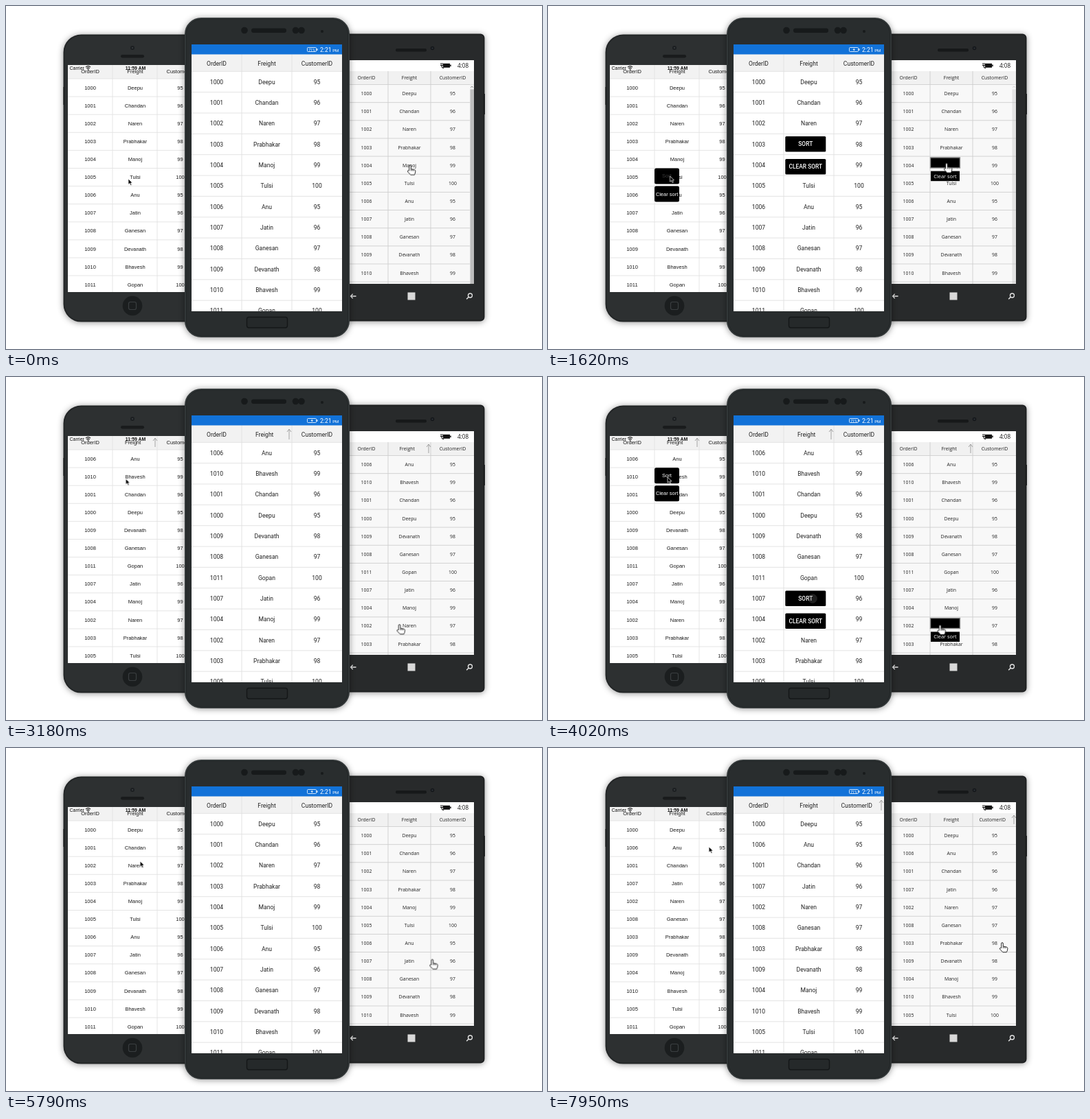
Recreate the animation shown at these times as an HTML page. Size 780x500 px, loop 8000 ms.

```html
<!DOCTYPE html>
<html lang="en">
<head>
<meta charset="utf-8">
<title>Sorting a grid on three phones</title>
<style>
  html, body { margin: 0; width: 100%; height: 100%; overflow: hidden; background: #fff; }
  svg { display: block; width: 780px; height: 500px; }
  text { text-anchor: middle; white-space: pre; }
  .start { text-anchor: start; }
  .ios { font-family: "Liberation Sans", Arial, sans-serif; font-size: 7.5px; }
  .droid { font-family: Roboto, sans-serif; font-size: 8.6px; }
  .win { font-family: "Open Sans", sans-serif; font-size: 6.9px; }
  .droid .popup { font-size: 8.4px; font-weight: 500; }
  .win .popup { font-size: 7.4px; }
  .shadow { filter: drop-shadow(0 1px 5px rgba(0, 0, 0, .42)); }
  .popup text { fill: #fff; }
  .fade { animation: fade 8s linear infinite; }
  @keyframes fade {
    0%, 4% { opacity: 1; }
    14%, 21% { opacity: .35; }
    23%, 100% { opacity: 0; }
  }
</style>
</head>
<body>
<svg viewBox="0 0 780 500" id="stage"></svg>
<script>
const LOOP = 8000;
const stage = document.getElementById('stage');
const sheet = document.head.appendChild(document.createElement('style'));
let rules = 0;

// Returns a class whose keyframes follow [ms, declaration] stops.
function motion(stops, easing) {
  const name = 'm' + rules++;
  const frames = stops.map(([ms, css]) => `${ms / LOOP * 100}%{${css}}`).join('');
  sheet.textContent += `@keyframes ${name}{${frames}}.${name}{animation:${name} ${LOOP}ms ${easing} infinite}`;
  return name;
}

// Visible only inside the given [from, to] spans.
function during(spans) {
  const stops = [[0, 'visibility:hidden']];
  for (const [from, to] of spans) {
    if (from === 0) stops.pop();
    stops.push([from, 'visibility:visible']);
    if (to < LOOP) stops.push([to, 'visibility:hidden']);
  }
  return motion(stops, 'step-end');
}

const path = points => motion(points.map(([ms, x, y]) => [ms, `transform:translate(${x}px,${y}px)`]), 'linear');

const rect = (x, y, w, h, fill, more = '') =>
  `<rect x="${x}" y="${y}" width="${w}" height="${h}" fill="${fill}" ${more}/>`;
const disc = (x, y, r, fill, more = '') => `<circle cx="${x}" cy="${y}" r="${r}" fill="${fill}" ${more}/>`;
const line = (d, color, width = 1, more = '') =>
  `<path d="${d}" fill="none" stroke="${color}" stroke-width="${width}" ${more}/>`;
const label = (x, y, str, more = '') => `<text x="${x}" y="${y}" ${more}>${str}</text>`;
const group = (cls, body) => `<g class="${cls}">${body}</g>`;

const heads = ['OrderID', 'Freight', 'CustomerID'];
const rows = ['Deepu', 'Chandan', 'Naren', 'Prabhakar', 'Manoj', 'Tulsi',
  'Anu', 'Jatin', 'Ganesan', 'Devanath', 'Bhavesh', 'Gopan']
  .map((name, i) => [1000 + i, name, 95 + i % 6]);
const orders = {
  id: rows,
  name: [...rows].sort((a, b) => a[1] < b[1] ? -1 : 1),
  customer: [...rows].sort((a, b) => a[2] - b[2])
};

// sorts: times of sort by name, clear, sort by customer.
const ios = {
  cls: 'ios', cols: [90, 155, 220, 286], centers: [122.5, 188, 253.5],
  clip: [90, 86, 180, 331], headTop: 86, headY: 95.5, top: 106, step: 26.1,
  headFill: '#f2f2f2', fill: '#fff', rule: '#e3e3e3', ink: '#1c1c1c', arrow: [3, 13],
  sorts: [1800, 4400, 7500],
  popup: { w: 36, h: 23, gap: 26, lift: 13, r: 2.5, dx: 0, names: ['Sort', 'Clear sort'] },
  popups: [[600, 1800, 1, 5], [3400, 4400, 1, 1], [6950, 7500, 2, 1]]
};
const win = {
  cls: 'win', cols: [493, 556, 618, 681], centers: [524.5, 587, 650],
  clip: [493, 79, 188, 326], headTop: 95, headY: 104.5, top: 114.5, step: 26.15,
  headFill: '#f1f1f1', fill: '#f8f8f8', rule: '#cfcfcf', ink: '#222', arrow: [3, 13],
  sorts: [1800, 4700, 7600],
  popup: { w: 42, h: 14.5, gap: 20, lift: 11.5, r: 0, dx: 1, names: ['Sort', 'Clear sort'] },
  popups: [[700, 1800, 1, 4], [3300, 4700, 1, 9], [6500, 7600, 2, 3]]
};
const droid = {
  cls: 'droid', cols: [270, 343, 416, 489], centers: [306.5, 379.5, 452.5],
  clip: [270, 56, 219, 389], headTop: 70, headY: 83.5, top: 95.3, step: 30.35,
  headFill: '#f2f2f2', fill: '#fff', rule: '#e0e0e0', ink: '#222', arrow: [4, 15],
  sorts: [2560, 4980, 7450],
  popup: { w: 59, h: 22.5, gap: 33, lift: 11.5, r: 1.5, dx: 2.3, names: ['SORT', 'CLEAR SORT'] },
  popups: [[900, 2560, 1, 3], [3500, 4980, 1, 7], [6600, 7450, 2, 4]]
};

const rowY = (p, i) => p.top + p.step * (i + .5);

function grid(p) {
  const [left, , , right] = p.cols, bottom = p.clip[1] + p.clip[3];
  const base = p.cls === 'ios' ? 2.6 : p.cls === 'droid' ? 3.1 : 2.5;
  let out = rect(left, p.headTop, right - left, p.top - p.headTop, p.headFill) +
    rect(left, p.top, right - left, bottom - p.top, p.fill);
  let rules = '';
  for (let i = 0; i <= 12; i++) rules += `M${left} ${p.top + i * p.step}H${right}`;
  for (const x of p.cols.slice(1, 3)) rules += `M${x} ${p.headTop}V${bottom}`;
  out += line(rules, p.rule, .9);

  const [byName, cleared, byCustomer] = p.sorts;
  const spans = { id: [[0, byName], [cleared, byCustomer]], name: [[byName, cleared]], customer: [[byCustomer, LOOP]] };
  for (const key in orders) {
    const sorted = { name: 1, customer: 2 }[key];
    let body = heads.map((h, c) => label(p.centers[c] - (c === sorted ? 3.3 : 0), p.headY + base, h)).join('');
    orders[key].forEach((row, i) => row.forEach((v, c) => body += label(p.centers[c], rowY(p, i) + base, v)));
    if (sorted) {
      const [inset, size] = p.arrow;
      body += line(`M${p.cols[sorted + 1] - inset} ${p.headY + size / 2}v${-size}m-3 4l3-4 3 4`, '#999', .9);
    }
    out += `<g class="${during(spans[key])}" fill="${p.ink}">${body}</g>`;
  }
  return out;
}

function popups(p) {
  const b = p.popup;
  return p.popups.map(([from, to, col, row]) => {
    const x = p.cols[col] + b.dx, y = rowY(p, row) - b.lift;
    const items = b.names.map((name, i) => {
      const top = y + i * b.gap;
      return rect(x, top, b.w, b.h, '#000', `rx="${b.r}"`) +
        label(x + b.w / 2, top + b.h / 2 + (p === droid ? 3 : 2.6), name);
    }).join('');
    return group('popup ' + during([[from, to]]), items);
  }).join('');
}

const screen = (p, body) =>
  `<clipPath id="${p.cls}Clip">${rect(...p.clip, '#000')}</clipPath>` +
  `<g class="${p.cls}" clip-path="url(#${p.cls}Clip)">${rect(...p.clip, '#fff')}${body}</g>`;

const pressed = (x, y, span) => group(during([span]),
  rect(x, y, 43, 15, '#000', 'stroke="#8b8b8b" stroke-width="1.4"'));

function leftPhone() {
  const pointer = path([[0, 178, 252], [1300, 178, 252], [1600, 177.5, 248], [1850, 177.5, 248],
    [2490, 184, 235], [3200, 174, 146], [4100, 174, 146], [4300, 175, 168], [4500, 176, 169],
    [5100, 181, 171], [5600, 181, 171], [6500, 248, 143], [7000, 248, 143], [7350, 236, 144], [8000, 234, 144]]);
  const status = label(92.5, 92.5, 'Carrier', 'class="start" font-size="7" fill="#111"') +
    label(188.5, 92.5, '11:59 AM', 'font-size="6.9" font-weight="700" fill="#111"') +
    line('M116 89.2q3.5-3.2 7 0M117.4 91q2.1-1.8 4.2 0', '#111', 1.1) + disc(119.5, 92.6, .9, '#111');
  const dim = group(during([[1480, 1800]]),
    rect(157, 238, 32, 19, '#000') + label(173, 250.2, 'Sort', 'fill="#3a3a3a"'));
  return group('shadow', rect(84.5, 42.5, 200, 417, '#2d3031', 'rx="25" stroke="#232627" stroke-width="2"')) +
    disc(184, 61, 3, '#1b1e20') + disc(184, 61, 1.2, '#35393d') +
    rect(167, 71, 34, 4.5, '#191b1c', 'rx="2.2"') +
    rect(83.5, 118, 1.5, 26, '#1a1c1d') +
    disc(184, 437, 14.3, '#1b1e1f') +
    rect(178.5, 431.5, 11, 11, 'none', 'rx="2.5" stroke="#3a3e40" stroke-width="1.2"') +
    screen(ios, grid(ios) + status + popups(ios) + dim + group(pointer,
      '<path d="M0 0V8.2L2 6.4 3.5 9.6 4.9 9 3.5 5.9H6Z" fill="#000" stroke="#fff" stroke-width=".7"/>'));
}

function rightPhone() {
  const hand = path([[0, 588, 232.5], [900, 588, 232.5], [1450, 580, 229.5], [1850, 580, 229.5],
    [2300, 573, 319], [2550, 573, 319], [3000, 573, 361], [4250, 570, 362], [4500, 574, 377],
    [4720, 575, 377], [5050, 610, 347], [5600, 610, 347], [6300, 648, 206], [7500, 648, 206],
    [7880, 661, 284], [8000, 661, 284]]);
  const battery = rect(636, 83.8, 10, 6, '#111') + rect(646.2, 85.5, 1.5, 2.6, '#111') +
    line('M632 84h4M632 86.4h4M634 86.5q0 4 3 4.2', '#111', 1.1);
  const scrollbar = group('fade', rect(675, 114.5, 6, 290.5, '#f0f0f0') +
    rect(675.5, 121.5, 5.5, 283.5, '#bdbdbd') + line('M676.3 119l1.8-2 1.8 2', '#777', .8));
  return group('shadow', rect(470, 41.5, 225.5, 417, '#282a2b', 'rx="5" stroke="#1e2021" stroke-width="2"')) +
    rect(567, 62, 45, 4.5, '#161819', 'rx="2"') +
    disc(620.5, 61.5, 2.8, '#15181b') + disc(620.5, 61.5, 1.1, '#32373d') +
    rect(695.5, 128, 1.5, 30, '#191b1c') +
    line('M509.5 423h-8m3.2-3.3-3.2 3.3 3.2 3.3', '#e4e4e4', 1.3) +
    rect(584.5, 417.5, 11, 11, '#d9d9d9') +
    line('M673.2 424.2l-3 3', '#e4e4e4', 1.5) +
    disc(675.5, 422, 3, 'none', 'stroke="#e4e4e4" stroke-width="1.3"') +
    screen(win, grid(win) + battery + label(665, 90.2, '4:08', 'font-size="8.1" fill="#111"') + scrollbar +
      popups(win) + pressed(556.5, 221, [1400, 1800]) + pressed(556.5, 351.5, [3700, 4350]) +
      group(hand, `<path d="M-1.3 7.5V1a1.3 1.3 0 0 1 2.6 0v4l5 1.1q1.7.5 1.6 2.2l-.5 3-1.1 2.4H.9
        L-3.5 9q-.5-1.6 1-1.6z" fill="#fff" stroke="#111" stroke-width=".9"/>` +
        line('M1.3 5v3M3.2 5.8V8M5.1 6.2V8.2', '#111', .7)));
}

function centerPhone() {
  const charging = [[600, 1850], [2950, 3700], [5400, 7050]];
  const idle = [[0, 600], [1850, 2950], [3700, 5400], [7050, LOOP]];
  const status = rect(270, 56, 219, 14.5, '#1272d8') +
    rect(438.5, 60.5, 13, 6, 'none', 'rx="1" stroke="#e6f0fb" stroke-width=".9"') +
    rect(452.3, 62, 1.2, 3, '#e6f0fb') +
    group(during(idle), label(445, 65.6, '71%', 'font-size="5.2" fill="#fff"')) +
    group(during(charging), '<path d="M446 61l-2.6 2.9h1.8l-.8 2.2 2.7-2.9h-1.8z" fill="#fff"/>') +
    label(457, 66.6, '2:21', 'class="start" font-size="8.6" fill="#fff"') +
    label(475.3, 66.6, 'PM', 'class="start" font-size="6" fill="#fff"');
  const touch = (x, y, span, fill, alpha) =>
    group(during([span]), disc(x, y, 6.5, fill, `opacity="${alpha}" stroke="#fff" stroke-opacity=".25"`));
  return group('shadow', rect(261, 18, 238, 464, '#292d2e', 'rx="23" stroke="#323738" stroke-width="2"')) +
    rect(262.5, 19.5, 235, 461, 'none', 'rx="21.5" stroke="#212526"') +
    disc(347, 35.5, 4.8, '#171a1b') + rect(357, 32.5, 51, 6.5, '#171a1b', 'rx="3"') +
    disc(421.5, 35.5, 4.8, '#171a1b') + disc(430, 35.5, 4.8, '#171a1b') + disc(460, 37, 2, '#171a1b') +
    rect(350.5, 453.5, 59, 15.5, '#25292a', 'rx="3" stroke="#141718" stroke-width="1.4"') +
    screen(droid, grid(droid) + status + popups(droid) +
      touch(379, 203, [2430, 2560], '#777', .4) +
      touch(385, 323, [3500, 4050], '#777', .25) +
      touch(379, 355, [4850, 4980], '#777', .4) +
      touch(451, 231.5, [6450, 6950], '#bbb', .7) +
      touch(449, 231.5, [7330, 7450], '#777', .4));
}

stage.innerHTML = leftPhone() + rightPhone() + centerPhone();
</script>
</body>
</html>
```
